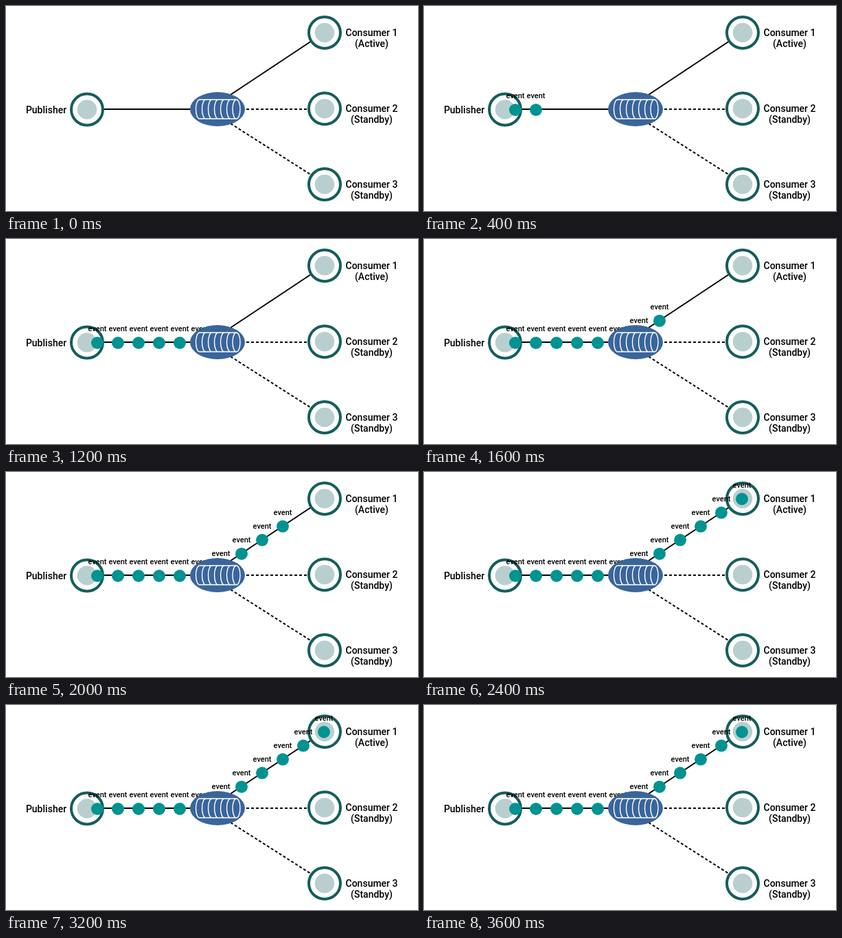
Recreate the animation shown at these times as an HTML page. Size 600 by 300 pixels, loop 3700 ms.

```html
<!DOCTYPE html>
<html lang="en">
<head>
<meta charset="utf-8">
<style>
html, body { margin: 0; width: 100%; height: 100%; overflow: hidden; background: #fff; }
svg { display: block; }
text { font: 500 14px Roboto, sans-serif; text-anchor: middle; }
.event text { font-size: 11px; }
.event circle { fill: #009391; }
.wire { stroke: #000; stroke-width: 2; }
.standby { stroke-dasharray: 4 3; }
.ring { fill: #fff; stroke: #155e5a; stroke-width: 4; }
.core { fill: #b9cfcf; }
.drum { fill: none; stroke: #fff; stroke-width: 1.4; }
</style>
</head>
<body>
<svg width="600" height="300" viewBox="0 0 600 300">
  <path class="wire" d="M140 151H270"/>
  <path class="wire" d="M326 130.5L446 50.5"/>
  <path class="wire standby" d="M350 151H441"/>
  <path class="wire standby" d="M327 172L445 247.5"/>
  <g id="nodes"></g>
  <g id="events"></g>
  <ellipse cx="308" cy="151" rx="40" ry="25" fill="#3a659b"/>
  <path class="drum" id="drum"/>
</svg>
<script>
const LOOP = 3700, STEP = 100, STRIDE = 15;
const START = 118, BEND = 298, END = 463;
const $ = id => document.getElementById(id);
const label = (x, y, s) => `<text x="${x}" y="${y}">${s}</text>`;
const node = (x, y) =>
  `<circle class="ring" cx="${x}" cy="${y}" r="23"/><circle class="core" cx="${x}" cy="${y}" r="14.3"/>`;

$("nodes").innerHTML = node(118, 151.5) + label(58.5, 157, "Publisher") +
  [[39, "Active"], [150.2, "Standby"], [261, "Standby"]].map(([y, state], i) => {
    const base = Math.round(y + 4.5);
    return node(464, y) + label(532.5, base, "Consumer " + (i + 1)) + label(532.5, base + 16, `(${state})`);
  }).join("");

// Left-hand arcs of the drum, closed by a full ellipse on the right
let drum = "M282 137H335.5M282 165H335.5";
for (let i = 0; i < 6; i++) drum += `M${282 + 9 * i} 137a5.5 14 0 0 0 0 28`;
$("drum").setAttribute("d", drum + "M335.5 137a5.5 14 0 0 0 0 28a5.5 14 0 0 0 0-28");

const pathY = x => x < BEND ? 152 : 39.5 + (END - x) * 0.668;

function event(x) {
  const y = pathY(x);
  return `<g class="event"><circle cx="${x}" cy="${y}" r="9"/>${label(x, y - 17, "event")}</g>`;
}

// A new event leaves the publisher on every second step
function draw(now) {
  const step = Math.floor(now % LOOP / STEP);
  let out = "";
  for (let born = 1; born <= step; born += 2) {
    const x = START + (step - born) * STRIDE;
    if (x <= END) out += event(x);
  }
  $("events").innerHTML = out;
}

const t0 = performance.now();
function tick() {
  draw(performance.now() - t0);
  requestAnimationFrame(tick);
}
tick();
</script>
</body>
</html>
```
